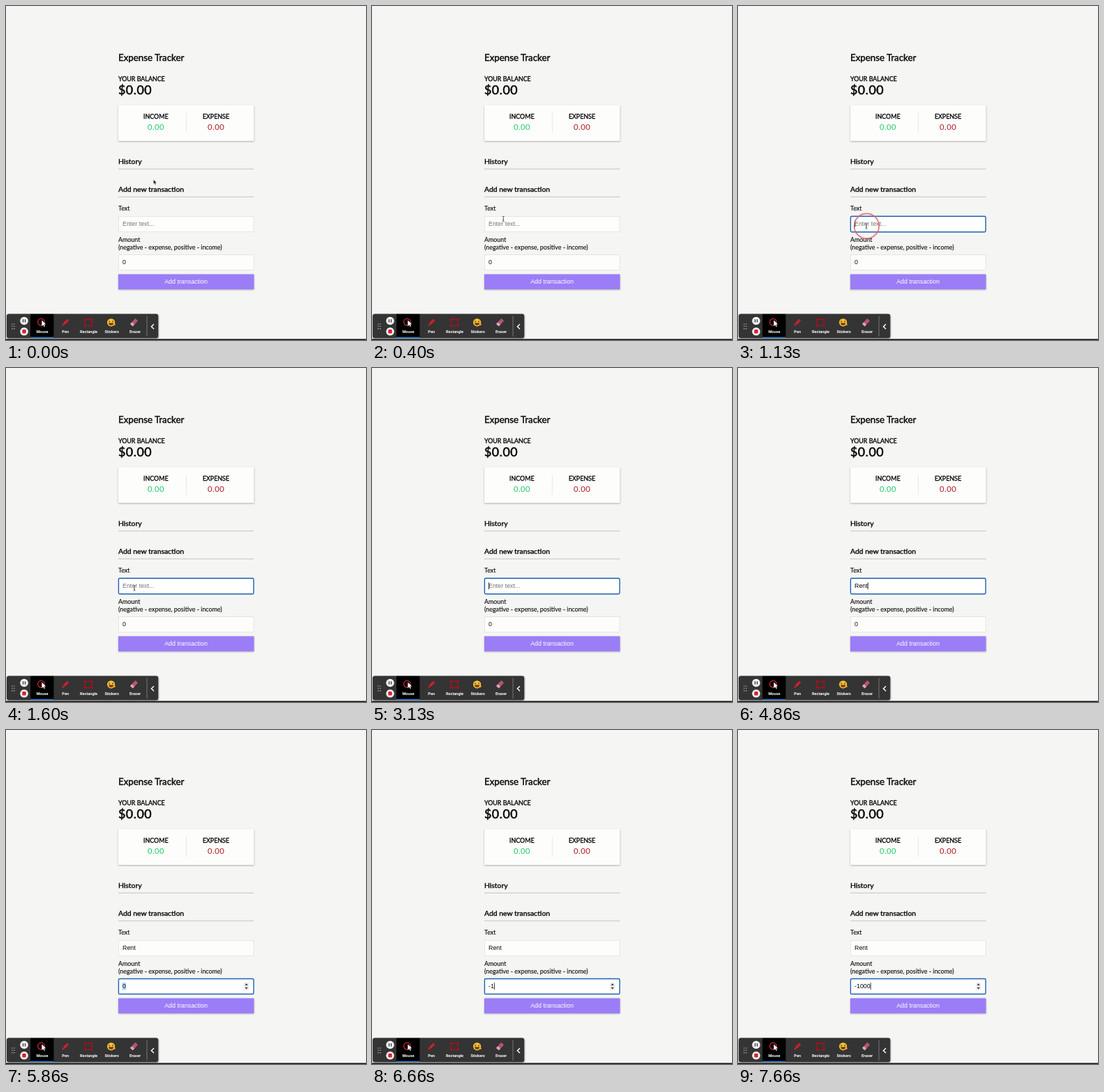
An HTML page that plays this animation: 516 by 480 pixels, repeating every 8000 ms.

```html
<!DOCTYPE html>
<html lang="en">
<head>
<meta charset="utf-8">
<title>Expense Tracker</title>
<style>
  html, body { margin: 0; width: 100%; height: 100%; overflow: hidden; background: #f5f5f4; }
  svg { display: block; width: 516px; height: 480px; }
  text { white-space: pre; }
  .lato { font-family: Lato, sans-serif; font-size: 8.88px; fill: #0b0b0b; stroke: #0b0b0b; stroke-width: .12px; }
  .bold { stroke-width: .36px; }
  .h1 { font-size: 17.75px; letter-spacing: .555px; stroke-width: .6px; }
  .h2 { font-size: 13.3px; stroke-width: .45px; }
  .h3 { font-size: 10.4px; stroke-width: .4px; }
  .money { font-size: 11.1px; letter-spacing: .555px; }
  .plus { fill: #2ecc71; stroke: #2ecc71; }
  .minus { fill: #b3262f; stroke: #b3262f; }
  .field { font: 8.88px "Liberation Sans", Arial, sans-serif; fill: #080808; }
  .tool { font: bold 5.6px Roboto, sans-serif; fill: #fff; }
  .mid { text-anchor: middle; }
</style>
</head>
<body>
<svg viewBox="0 0 516 480" xmlns="http://www.w3.org/2000/svg">
  <defs>
    <filter id="soft" x="-10%" y="-20%" width="120%" height="150%"><feGaussianBlur stdDeviation="1"/></filter>
  </defs>
  <rect width="516" height="480" fill="#f5f5f4"/>

  <text class="lato h2" x="161" y="79.3">Expense Tracker</text>
  <text class="lato bold" x="161" y="107.8">YOUR BALANCE</text>
  <text class="lato h1" x="161" y="127.2">$0.00</text>

  <rect x="161" y="143.3" width="194.5" height="51.6" fill="#000" opacity=".3" filter="url(#soft)"/>
  <rect x="161" y="142.3" width="194.4" height="51.6" fill="#fdfefc"/>
  <path d="M258.4 153.5V182.5" stroke="#dedede" stroke-width=".7"/>
  <text class="lato bold mid" x="214.8" y="161.8">INCOME</text>
  <text class="lato bold mid" x="301" y="161.8">EXPENSE</text>
  <text class="lato money mid plus" x="215" y="178">0.00</text>
  <text class="lato money mid minus" x="301.2" y="178">0.00</text>

  <text class="lato h3" x="161" y="226.6">History</text>
  <text class="lato h3" x="161" y="266.6">Add new transaction</text>
  <path d="M161 234.2H355.4M161 274.3H355.4" stroke="#b8b8b8" stroke-width=".8"/>

  <text class="lato" x="161" y="294.3">Text</text>
  <text class="lato" x="161" y="339.2">Amount</text>
  <text class="lato" x="161" y="349.8">(negative - expense, positive - income)</text>

  <rect id="nameBox" x="161.4" y="302.3" width="193.6" height="22.4"/>
  <text id="name" class="field" x="167" y="316.1"></text>
  <rect id="sumBox" x="161.4" y="357.5" width="193.6" height="22"/>
  <rect id="pick" x="166.7" y="363" width="5.4" height="10.6" fill="#b4d5fb"/>
  <text id="sum" class="field" x="167" y="371.4"></text>
  <g id="spin">
    <rect x="340.6" y="362.8" width="8" height="11.4" fill="#efefef"/>
    <path d="M342.4 367L344.6 364L346.8 367ZM342.4 369.8L344.6 372.8L346.8 369.8Z" fill="#444"/>
  </g>
  <rect id="caret" width=".8" height="10" fill="#000"/>

  <rect x="161" y="386.4" width="194.5" height="21.6" fill="#000" opacity=".3" filter="url(#soft)"/>
  <rect x="161" y="385.5" width="194.4" height="21.7" fill="#9b7df7"/>
  <text class="field mid" x="258" y="399.1" style="fill:#fff">Add transaction</text>

  <path d="M0 479.2H516" stroke="#151515" stroke-width="1.5"/>
  <rect x="1" y="443.5" width="217.5" height="34.5" rx="3" fill="#000" opacity=".5" filter="url(#soft)"/>
  <rect x="1" y="442.4" width="217.2" height="34.8" rx="3" fill="#343434"/>
  <path d="M8.8 456.5v8M11.8 456.5v8" stroke="#b5b5b5" stroke-width="1.3" stroke-dasharray="1.3 2"/>
  <circle cx="26" cy="452.5" r="5.8" fill="#f4f4f4"/>
  <path d="M24.5 450.2v4.6M27.5 450.2v4.6" stroke="#333" stroke-width="1.3"/>
  <circle cx="26" cy="467.8" r="5.8" fill="#f4f4f4"/>
  <rect x="23.3" y="465.1" width="5.4" height="5.4" rx=".8" fill="#d6232f"/>
  <rect x="35" y="442.8" width="33.4" height="34" fill="#000"/>
  <rect x="35" y="475.7" width="33.4" height="1.4" fill="#1e78d0"/>
  <circle cx="50.4" cy="454.3" r="4.9" fill="none" stroke="#d02630" stroke-width="1.3"/>
  <path d="M51.3 451.6v8.3l2-1.8 1.3 2.8 1.3-.6-1.3-2.7h2.6Z" fill="#fff"/>
  <g transform="translate(85 455) rotate(45)">
    <rect x="-1.7" y="-5.8" width="3.4" height="8.4" rx=".6" fill="#d8202c"/>
    <path d="M-1.7 3.2h3.4L0 6.6Z" fill="#d8202c"/>
    <path d="M-1.7-3.4h3.4" stroke="#7c121a" stroke-width=".6"/>
  </g>
  <rect x="113.2" y="450.4" width="10" height="9" fill="none" stroke="#b30d1b" stroke-width="1.3"/>
  <g fill="#b30d1b">
    <rect x="112" y="449.2" width="2.4" height="2.4"/><rect x="122" y="449.2" width="2.4" height="2.4"/>
    <rect x="112" y="458.2" width="2.4" height="2.4"/><rect x="122" y="458.2" width="2.4" height="2.4"/>
  </g>
  <circle cx="150.6" cy="454.8" r="5.6" fill="#f7c331"/>
  <path d="M147.2 452.6l2 .8-2 .8M154 452.6l-2 .8 2 .8" fill="none" stroke="#54370c" stroke-width=".8"/>
  <path d="M147.2 455.6h6.8a3.4 3.4 0 0 1-6.8 0Z" fill="#6b3410"/>
  <path d="M149 458.2a2 1.2 0 0 1 3.2 0Z" fill="#e04a4a"/>
  <circle cx="155.2" cy="457.6" r="1.5" fill="#f0a92c"/>
  <g transform="translate(183.4 454.8) rotate(42)">
    <rect x="-2.6" y="-5.6" width="5.2" height="7.6" rx=".7" fill="#b5566c"/>
    <rect x="-2.6" y="1.6" width="5.2" height="3.8" rx=".7" fill="#e3a3b2"/>
  </g>
  <g class="mid">
    <text class="tool" x="52" y="469.8">Mouse</text>
    <text class="tool" x="85.2" y="469.8">Pen</text>
    <text class="tool" x="118.5" y="469.8">Rectangle</text>
    <text class="tool" x="151.7" y="469.8">Stickers</text>
    <text class="tool" x="185" y="469.8">Eraser</text>
  </g>
  <path d="M202 445.5V475" stroke="#8a8a8a" stroke-width=".8"/>
  <path d="M212 457.2l-3.6 3.5 3.6 3.5" fill="none" stroke="#fff" stroke-width="1.4"/>

  <circle id="ring" cx="184.3" cy="316.2" r="17.8" fill="none" stroke="#e0606a" stroke-width="1.7"/>
  <path id="arrow" d="M0 0V6.3L1.5 5 2.5 7.3 3.6 6.8 2.6 4.6H4.6Z" fill="#111" stroke="#fff" stroke-width=".4"/>
  <path id="beam" d="M-1.5-3.7Q0-3.7 0-2.7Q0-3.7 1.5-3.7M0-2.7V2.7M-1.5 3.7Q0 3.7 0 2.7Q0 3.7 1.5 3.7M-.9 1.2H.9" fill="none" stroke="#333" stroke-width=".75"/>
</svg>
<script>
const LOOP = 8000, CLICK = 1130, TAB = 4930;
const nameKeys = [3860, 4130, 4330, 4530];
const sumKeys = [6260, 6660, 6930, 7260, 7660];
const $ = id => document.getElementById(id);
const set = (id, attrs) => { for (const k in attrs) $(id).setAttribute(k, attrs[k]); };
const show = (id, on) => set(id, { visibility: on ? "visible" : "hidden" });
const typed = (word, keys, t) => word.slice(0, keys.filter(k => t >= k).length);
const write = (id, s) => { if ($(id).textContent !== s) $(id).textContent = s; };

function box(id, focus) {
  set(id, {
    fill: focus ? "#fff" : "#fdfefc",
    stroke: focus ? "#1f62b0" : "#dcdcdc",
    "stroke-width": focus ? 1.4 : .7,
    rx: focus ? 1.6 : 0
  });
}

function pointer(t) {
  const step = t < 60 ? 0 : Math.min(8, Math.floor((t - 60) / 67.2) + 1);
  const p = step / 8, e = p * p * (3 - 2 * p);
  const x = 211.4 - 27.4 * e, y = 249.6 + 66.8 * e;
  const over = y > 302, at = `translate(${x} ${y})`;
  set("arrow", { transform: at });
  set("beam", { transform: at });
  show("arrow", !over);
  show("beam", over && t < 2860);
}

function draw(t) {
  pointer(t);
  const inName = t >= CLICK && t < TAB, inSum = t >= TAB;
  box("nameBox", inName);
  box("sumBox", inSum);

  const word = typed("Rent", nameKeys, t), num = typed("-1000", sumKeys, t);
  write("name", word || "Enter text...");
  $("name").style.fill = word ? "#080808" : "#757575";
  write("sum", num || "0");
  show("pick", inSum && !num);
  show("spin", inSum);

  const blink = Math.floor((t - CLICK + 30) / 500) % 2 === 0;
  const w = inSum ? num && $("sum").getComputedTextLength()
                  : word && $("name").getComputedTextLength();
  set("caret", { x: 167 + (w || 0), y: inSum ? 363.2 : 308.2 });
  show("caret", inSum ? num : inName && (word || blink));

  const fade = Math.max(0, (t - CLICK - 130) / 340);
  set("ring", { opacity: .85 * (1 - fade) });
  show("ring", t >= CLICK && t < 1600);
}

function tick() {
  draw(performance.now() % LOOP);
  requestAnimationFrame(tick);
}
tick();
</script>
</body>
</html>
```
